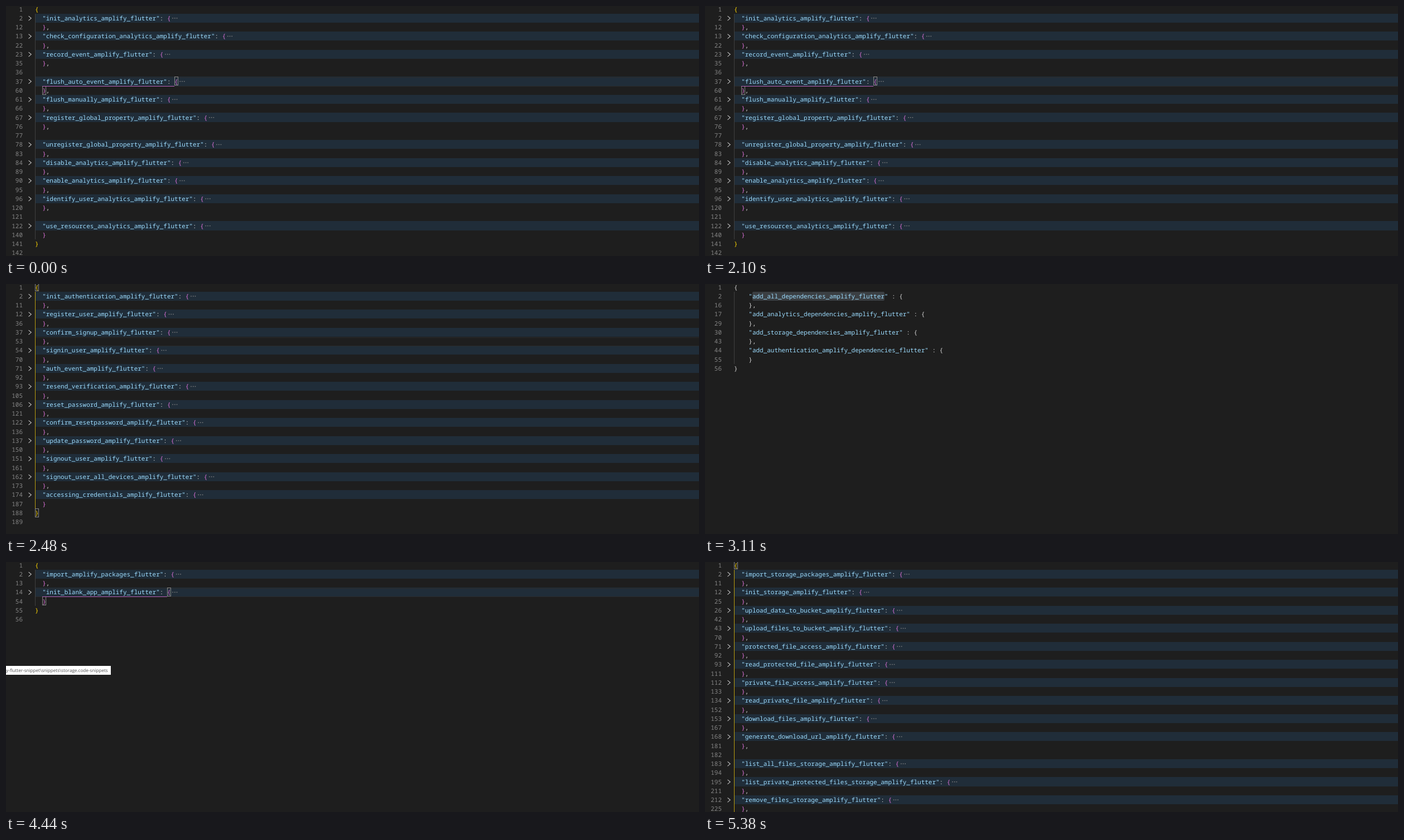
Write an HTML page with a canvas that moves like this. It is 1243 px wide and 450 px high and loops after 6610 ms.

```html
<!DOCTYPE html>
<html lang="en">
<head>
<meta charset="utf-8">
<style>
html, body { margin: 0; width: 100%; height: 100%; overflow: hidden; background: #1e1e1e; }
canvas { display: block; }
</style>
</head>
<body>
<canvas id="stage" width="1243" height="450"></canvas>
<script>
const ctx = document.getElementById('stage').getContext('2d');
const W = 1243, H = 450, LOOP = 6610;
const LEFT = 52, CHAR = 6.582, ROW = 16.25, FIRST = 5.6;
const CODE_FONT = '500 10.97px "Noto Sans Mono", monospace';
const TIP_FONT = '8.14px "Open Sans", sans-serif';
const YELLOW = '#ffd700', PURPLE = '#da70d6', PLAIN = '#d4d4d4', KEY = '#9cdcfe';
const PLAIN_LEVEL = 0, BOXES = 1, FOLDS = 2, COLOURS = 3;

// Each entry is a key and the line number of its closing brace; '' is a blank line.
const files = {
  analytics: {
    entries: ['init_analytics 12', 'check_configuration_analytics 22', 'record_event 35', '',
      'flush_auto_event 60', 'flush_manually 66', 'register_global_property 76', '',
      'unregister_global_property 83', 'disable_analytics 89', 'enable_analytics 95',
      'identify_user_analytics 120', '', 'use_resources_analytics 140'],
    current: 8, boxes: [[8, 38], [9, 2]]
  },
  authentication: {
    entries: ['init_authentication 11', 'register_user 36', 'confirm_signup 53', 'signin_user 70',
      'auth_event 92', 'resend_verification 105', 'reset_password 121', 'confirm_resetpassword 136',
      'update_password 150', 'signout_user 161', 'signout_user_all_devices 173',
      'accessing_credentials 187'],
    current: 6, boxes: [[0, 0], [25, 0]]
  },
  dependencies: {
    entries: ['add_all_dependencies 16', 'add_analytics_dependencies 29',
      'add_storage_dependencies 43', 'add_authentication_amplify_dependencies_flutter 55'],
    indent: 4, separator: ' : ', noLastLine: true, boxes: [], word: [1, 5, 36], outer: true
  },
  general: {
    entries: ['import_amplify_packages_flutter 13', 'init_blank_app 54'],
    current: 3, boxes: [[3, 36], [4, 2]]
  },
  storage: {
    entries: ['import_storage_packages 11', 'init_storage 25', 'upload_data_to_bucket 42',
      'upload_files_to_bucket 70', 'protected_file_access 92', 'read_protected_file 111',
      'private_file_access 133', 'read_private_file 152', 'download_files 167',
      'generate_download_url 181', '', 'list_all_files_storage 194',
      'list_private_protected_files_storage 211', 'remove_files_storage 225'],
    boxes: [[0, 0]], continues: true
  }
};

const scenes = [
  [0, 'analytics', COLOURS],
  [2240, 'authentication', BOXES], [2410, 'authentication', FOLDS], [2480, 'authentication', COLOURS],
  [3110, 'dependencies', PLAIN_LEVEL], [3260, 'dependencies', COLOURS],
  [3720, 'general', PLAIN_LEVEL], [3790, 'general', BOXES], [3960, 'general', COLOURS],
  [5130, 'storage', PLAIN_LEVEL], [5200, 'storage', BOXES], [5270, 'storage', FOLDS],
  [5380, 'storage', COLOURS]
];

const tooltips = [
  { from: 1320, to: 2100, y: 135, width: 227.5, label: 'plify-flutter-snippet\\snippets\\authentication.code-snippets' },
  { from: 4440, to: 4980, y: 187, width: 188, label: 'y-flutter-snippet\\snippets\\storage.code-snippets' }
];

const colX = col => LEFT + col * CHAR;
const rowY = row => FIRST + row * ROW;
const rowTop = row => Math.round(rowY(row) - ROW / 2);

function buildRows({ entries, indent = 2, separator = ': ', noLastLine, continues }) {
  const rows = [{ number: 1, col: 0, open: true }];
  let number = 2;
  entries.forEach((entry, i) => {
    if (!entry) return rows.push({ number: number++ });
    const [name, end] = entry.split(' ');
    const key = `"${name.includes('amplify') ? name : name + '_amplify_flutter'}"`;
    const comma = continues || i < entries.length - 1;
    rows.push({ number, col: indent, key, separator, open: true });
    rows.push({ number: +end, col: indent, comma });
    number = +end + 1;
  });
  if (!continues) {
    rows.push({ number: number++, col: 0 });
    if (!noLastLine) rows.push({ number });
  }
  return rows;
}
for (const file of Object.values(files)) file.rows = buildRows(file);

function rect(x, y, w, h, colour) {
  ctx.fillStyle = colour;
  ctx.fillRect(x, y, w, h);
}

function text(string, x, y, colour, align = 'left') {
  ctx.fillStyle = colour;
  ctx.textAlign = align;
  ctx.fillText(string, x, y);
}

function drawFoldMarks(y, braceX) {
  ctx.strokeStyle = '#c5c5c5';
  ctx.lineWidth = 1.1;
  ctx.beginPath();
  ctx.moveTo(40.5, y - 3.8);
  ctx.lineTo(45.2, y + 0.2);
  ctx.lineTo(40.5, y + 4.2);
  ctx.stroke();
  for (let i = 0; i < 3; i++) rect(braceX + 9.4 + i * 3.7, y - 0.6, 1.6, 1.4, '#808080');
}

function drawRow(row, i, level) {
  const y = rowY(i), baseline = Math.round(y + 4);
  text(row.number, 30, baseline, '#858585', 'right');
  if (row.col === undefined) return;
  let col = row.col;
  if (row.key) {
    text(row.key, colX(col), baseline, KEY);
    col += row.key.length;
    text(row.separator, colX(col), baseline, PLAIN);
    col += row.separator.length;
  }
  const colour = level < COLOURS ? PLAIN : row.col ? PURPLE : YELLOW;
  text(row.open ? '{' : '}', colX(col), baseline, colour);
  if (row.comma) text(',', colX(col + 1), baseline, PLAIN);
  if (row.key && level >= FOLDS) drawFoldMarks(y, colX(col));
}

function drawFile({ rows, current, boxes, word, outer, continues }, level) {
  if (level >= FOLDS) rows.forEach((row, i) => {
    if (row.key) rect(LEFT + 1, rowTop(i), W, rowTop(i + 1) - rowTop(i), '#202d39');
  });
  if (current) {
    rect(LEFT, rowTop(current) + 1, W, 1, '#2a2b2c');
    rect(LEFT, rowTop(current + 1), W, 1, '#2a2b2c');
  }
  if (word) {
    const [row, col, length] = word;
    ctx.fillStyle = '#3b3f43';
    ctx.beginPath();
    ctx.roundRect(colX(col), rowTop(row), length * CHAR, 16, 2);
    ctx.fill();
  }

  const lastBrace = continues ? rows.length : rows.findLastIndex(row => row.col === 0);
  const outerActive = outer || boxes[0][0] === 0;
  const guide = outerActive && level === COLOURS ? '#b89d10' : '#404040';
  rect(LEFT, rowTop(1), 1, rowTop(lastBrace) - rowTop(1), guide);

  if (level >= BOXES) {
    ctx.strokeStyle = '#888';
    ctx.lineWidth = 1;
    for (const [row, col] of boxes)
      ctx.strokeRect(Math.round(colX(col)) + 0.5, rowTop(row) + 0.5, 6, 15);
  }
  if (level === COLOURS && !outerActive) {
    const [row, col] = boxes[0];
    rect(colX(2), rowTop(row + 1), colX(col) - colX(2), 1, '#b860b5');
  }
  ctx.font = CODE_FONT;
  rows.forEach((row, i) => drawRow(row, i, level));
}

function drawTooltip({ y, width, label }) {
  rect(0, y, width, 16, '#fff');
  ctx.font = TIP_FONT;
  text(label, width - 5.3, y + 11, '#505050', 'right');
}

function draw(now) {
  const time = now % LOOP;
  const [, name, level] = scenes.findLast(([start]) => start <= time);
  ctx.textRendering = 'geometricPrecision';
  rect(0, 0, W, H, '#1e1e1e');
  drawFile(files[name], level);
  tooltips.filter(tip => time >= tip.from && time < tip.to).forEach(drawTooltip);
  requestAnimationFrame(draw);
}
requestAnimationFrame(draw);
</script>
</body>
</html>
```
